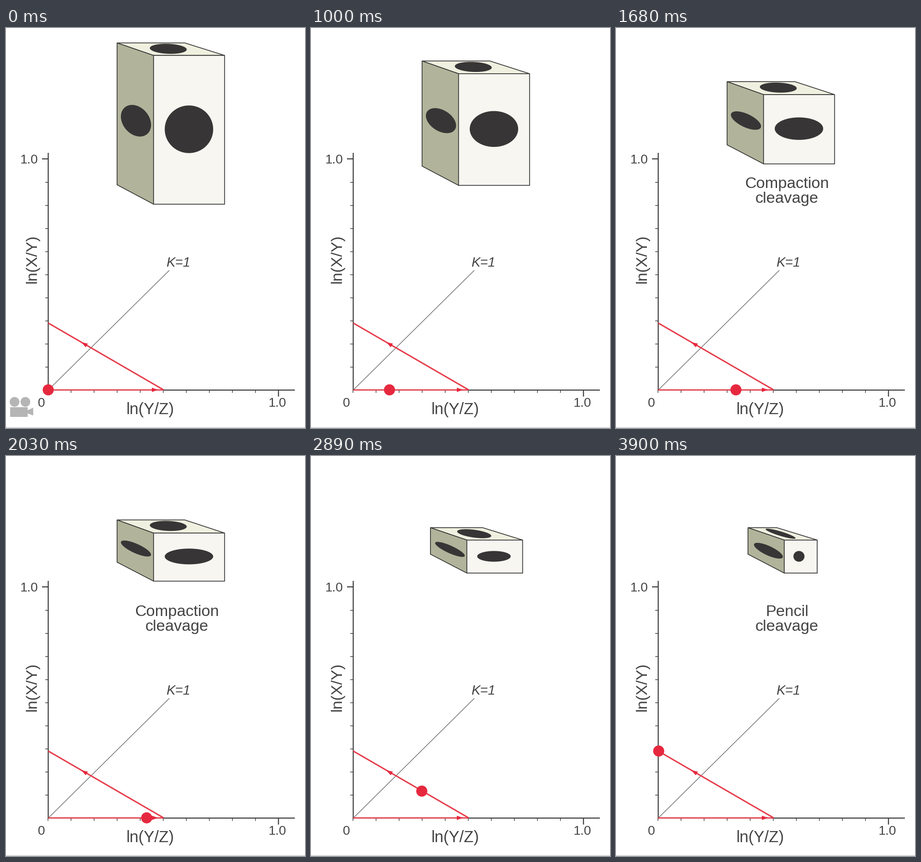
These frames come from a looping animation (648 px wide and 865 px high, 4.56 s). A matplotlib script:

```python
import numpy as np
import matplotlib.pyplot as plt
from matplotlib.animation import FuncAnimation
from matplotlib.patches import Circle, Polygon, Rectangle

W, H, DPI = 648, 865, 100
LOOP, TICK = 4560, 20
INK, DARK, RED = "#363636", "#383536", "#e6283f"
LINE_RED, GREY = "#e63b49", "#b5b5b5"

# The motion runs at 15 steps a second, with a doubled step after each run.
RUNS = [(530, 4), (860, 4), (1200, 5), (1610, 4), (1950, 4),
        (2290, 4), (2625, 5), (3030, 4), (3370, 4), (3700, 4)]
STEPS = np.array([t0 + j * 200 / 3 for t0, n in RUNS for j in range(n)])
TURN, LAST = 22, 42

fig = plt.figure(figsize=(W / DPI, H / DPI), dpi=DPI, facecolor="white")
ax = fig.add_axes([0, 0, 1, 1])
ax.set_xlim(0, W)
ax.set_ylim(H, 0)
ax.axis("off")


def px(n):
    return n * 72 / DPI


def line(x, y, color=INK, width=2.2, z=2):
    ax.plot(x, y, color=color, lw=px(width), zorder=z,
            solid_capstyle="butt", snap=False)


def label(x, y, s, size, **kw):
    return ax.text(x, y, s, fontsize=px(size), family="Liberation Sans",
                   color="#434343", va="baseline", **kw)


def shape(color, edge=None, z=5):
    p = Polygon([(0, 0), (1, 0), (1, 1)], closed=True, fc=color,
                ec=edge or "none", lw=px(1.7) if edge else 0,
                joinstyle="miter", snap=False, zorder=z)
    return ax.add_patch(p)


def arrow(tip, direction, length=14, half=4.6):
    d = np.array(direction) / np.hypot(*direction)
    n = np.array([-d[1], d[0]])
    base = np.array(tip) - d * length
    ax.add_patch(Polygon([tip, base + n * half, base - n * half],
                         fc=RED, lw=0, zorder=4))


def draw_chart():
    line([91.5, 91.5], [270, 784])
    line([90.5, 626], [783, 783])
    unit = 49.95
    for i in range(10):
        x, y = 91 + i * unit, 783.3 - i * unit
        line([x, x], [783, 789], width=1.4)
        if i:
            line([85, 91], [y, y], width=1.4)
    line([78, 91], [283, 283])
    line([590.5, 590.5], [783, 797])
    line([91.5, 354], [783, 524], "#555555", 1.2)

    line([91, 341.5], [782.7, 782.7], LINE_RED, 2.6, 3)
    line([341.5, 91.5], [782.5, 638], LINE_RED, 3, 3)
    arrow((330, 782.5), (1, 0))
    arrow((163, 679.5), (-250, -144.5))

    label(30.5, 293, "1.0", 28)
    label(568.5, 819, "1.0", 28)
    label(68.5, 819, "0", 28)
    label(347, 516, "K=1", 29, style="italic")
    label(260.5, 835, "ln(Y/Z)", 34.7)
    label(65.5, 551.5, "ln(X/Y)", 34.5, rotation=90, rotation_mode="anchor")
    line([0, W], [864, 864], "#cfcfcf", 1.5)


def draw_camera():
    parts = [Circle((18.5, 808.5), 10.5), Circle((42, 808.5), 10.5),
             Rectangle((9, 820), 38, 21),
             Polygon([(46, 827), (59, 821), (59, 838), (46, 833)])]
    for p in parts:
        p.set(fc=GREY, lw=0)
        ax.add_patch(p)
    return parts


def caption(first):
    return [label(370.5, y, s, 34.3, ha="center")
            for y, s in ((346, first), (378, "cleavage"))]


draw_chart()
camera = draw_camera()
compaction = caption("Compaction")
pencil = caption("Pencil")
top = shape("#f0f0e0", INK)
side = shape("#b1b49a", INK)
front = shape("#f7f6f1", INK)
top_spot, side_spot, front_spot = (shape(DARK, z=6) for _ in range(3))
dot = ax.add_patch(Circle((91.5, 782.5), 12, fc=RED, lw=0, zorder=8))

ANGLE = np.linspace(0, 2 * np.pi, 72, endpoint=False)


def oval(cx, cy, ux, uy, v):
    """Ellipse with one slanted half axis (ux, uy) and one upright (0, v)."""
    c, s = np.cos(ANGLE), np.sin(ANGLE)
    return np.column_stack([cx + ux * c, cy + uy * c + v * s])


def mix(a, b, k):
    return a + (b - a) * k


def draw_block(a, b):
    """a: flattening 0..1, then b: narrowing 0..1."""
    back_y = mix(32.3, 155, a)
    top_y = min(59.3 + 124.3 * a, 181.8)
    low_y = mix(381, 253.2, a)
    side_y = mix(339, 212.3, a)
    x0, x1 = mix(240.7, 286, b), mix(319.8, 364.7, b)
    x2, x3 = mix(473.7, 436, b), mix(387.5, 348.5, b)

    top.set_xy([(x0, back_y), (x3, back_y), (x2, top_y), (x1, top_y)])
    side.set_xy([(x0, back_y), (x1, top_y), (x1, low_y), (x0, side_y)])
    front.set_xy([(x1, top_y), (x2, top_y), (x2, low_y), (x1, low_y)])

    top_spot.set_xy(oval(mix(351.7, 356.7, b), mix(45, 168, a),
                         mix(40, 32.5, b), mix(1.5, 9.7, b),
                         mix(10.8, 5, b)))
    side_spot.set_xy(oval(mix(281.7, 330.3, b), mix(200.5, 200, a) + 4.8 * b,
                          mix(32.7, 31.3, b), mix(9, 14, a) - b,
                          mix(33, 7.5, a) + 3.5 * b))
    front_spot.set_xy(oval(396.5, mix(219, 217, a),
                           mix(52.5, 12, b), 0, mix(51.5, 11.6, a)))


def show(artists, on):
    for art in artists:
        art.set_visible(on)


def update(i):
    t = i * TICK + TICK / 2
    step = int(np.sum(STEPS <= t + 4))
    a = min(step / TURN, 1)
    b = max(step - TURN, 0) / (LAST - TURN)

    draw_block(a, b)
    dot.center = (mix(91.5, 338.5, a) - 246 * b, 782.5 - 144.5 * b)
    show(camera, step == 0)
    show(compaction, 14 <= step < 27)
    show(pencil, step >= 35)
    return []


anim = FuncAnimation(fig, update, frames=LOOP // TICK, interval=TICK,
                     repeat=True, repeat_delay=0, blit=False)
plt.show()
```
